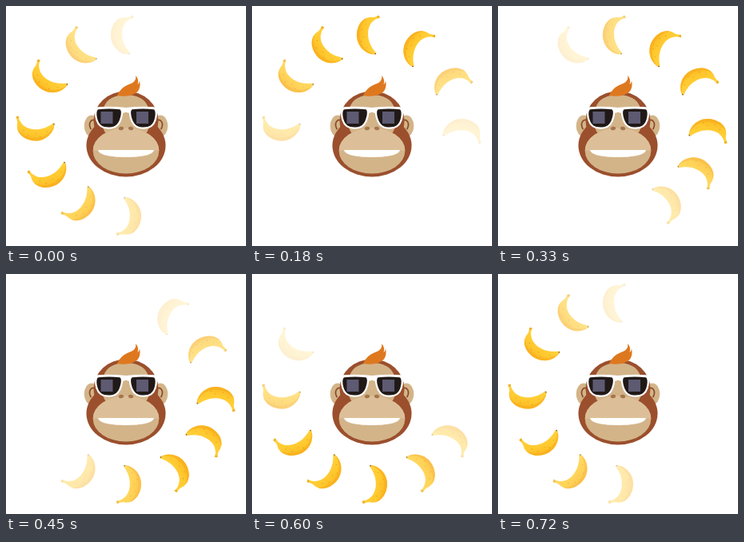
Write an HTML page that moves like this. It is 300 by 300 pixels and loops after 0.75 s.

```html
<!DOCTYPE html>
<html lang="en">
<head>
<meta charset="utf-8">
<title>Banana spinner</title>
<style>
  html, body { margin: 0; width: 100%; height: 100%; overflow: hidden; background: #fff; }
  svg { display: block; width: 100vw; height: 100vh; }
</style>
</head>
<body>
<svg viewBox="0 0 300 300" xmlns="http://www.w3.org/2000/svg">
  <defs>
    <linearGradient id="peel" x1="0" y1="0" x2="0" y2="1">
      <stop offset="0.1" stop-color="#ffd13a"/>
      <stop offset="0.6" stop-color="#ffc92f"/>
      <stop offset="1" stop-color="#fbb822"/>
    </linearGradient>

    <!-- Stem at (-24,0), tip at (24,0), belly towards +y -->
    <g id="banana">
      <path fill="url(#peel)" d="M-25.4 .2 L-22.4 -1.4 C-21.2 2 -20.2 4 -18.2 5.8
        C-14.500 10 -9 12 -2 11.700 C8 11 15.500 6 21.700 -.6 L23.500 .2
        C24.600 7.500 21.200 15.500 14.500 20.600 C7 26.300 -3 27 -11.500 23.600
        C-18.500 20.300 -22.600 14.500 -22.200 8 C-22.400 5 -24 3 -25.400 .2Z"/>
      <path fill="#f8ac1c" opacity=".6" d="M23.500 1.500 C24.300 8 21 15.700 14.500 20.600
        C7 26.300 -3 27 -11.500 23.600 C-16 21.500 -19.500 18.500 -21 14.500
        C-13 23 1 24.600 11.500 18.500 C18 14.200 21.800 8.500 23.500 1.500Z"/>
      <path fill="#edb02b" d="M-25.400 .2 L-22.400 -1.400 L-21.700 1 L-24.100 2.500Z"/>
      <path fill="#7a5220" d="M21.900 -.6 L23.300 -.4 L23.700 1.300 L22.600 1.200Z"/>
      <g fill="#d29222">
        <circle cx="-13" cy="15" r=".6"/>
        <circle cx="-6" cy="20" r=".6"/>
        <circle cx="3" cy="16.500" r=".5"/>
        <circle cx="9" cy="19" r=".6"/>
        <circle cx="16" cy="11" r=".5"/>
      </g>
    </g>

    <g id="ear">
      <ellipse cx="107" cy="150" rx="9.300" ry="13.400" fill="#d3b489"/>
      <path d="M106 153.500 C102.500 147 106 140.500 111.500 143" fill="none" stroke="#8a4a28" stroke-width="1.700" stroke-linecap="round"/>
    </g>

    <path id="lens" d="M115.500 129.300 Q129 127.800 142 129.300 C144.800 130 144.300 137 141.500 143.500
      C138.500 150 134 151.500 128 151.500 C120.500 151.500 116.500 148.500 114.500 142 C112.800 136.500 112.800 130 115.500 129.300Z"/>
  </defs>

  <g id="ring"></g>

  <use href="#ear"/>
  <use href="#ear" transform="matrix(-1 0 0 1 300 0)"/>
  <g fill="#9b4f2d">
    <ellipse cx="150" cy="143.500" rx="40.500" ry="37"/>
    <ellipse cx="150" cy="174.500" rx="49.500" ry="39"/>
  </g>
  <g fill="#d3b489">
    <path d="M150 111 C164 111 174 116 178 127 C183 136 181 155 172 163
      H128 C119 155 117 136 122 127 C126 116 136 111 150 111Z"/>
    <ellipse cx="150" cy="181" rx="41.300" ry="28.500"/>
  </g>
  <path fill="#dcbf98" d="M108.700 180.500 A41.300 28 0 0 1 191.300 180.500Z"/>
  <path fill="#de781f" d="M139 112 C143 103 149 99.500 156 97 C161 95 163 91 162 87
    C165 90 166 94 164.500 98 C166 97 167 95 167 93 C168.500 100 167 106 162 109
    C155 113 146 113.500 139 112Z"/>

  <g fill="#a47650">
    <ellipse cx="144" cy="153" rx="3.200" ry="2.200" transform="rotate(-15 144 153)"/>
    <ellipse cx="156" cy="153" rx="3.200" ry="2.200" transform="rotate(15 156 153)"/>
  </g>
  <path fill="#fff" d="M115 180 H185 C184 186 170 189 150 189 C130 189 116 186 115 180Z"/>

  <g fill="#fff" stroke="#fff" stroke-width="4.600" stroke-linejoin="round">
    <use href="#lens"/>
    <use href="#lens" transform="matrix(-1 0 0 1 300 0)"/>
  </g>
  <path fill="#fff" d="M110.500 126.500 Q130 125 150 127 Q170 125 189.500 126.500 L188.500 132 H157
    Q154 132 153 134 Q150 131.500 147 134 Q146 132 143 132 H111.500Z"/>
  <g fill="#211917">
    <use href="#lens"/>
    <use href="#lens" transform="matrix(-1 0 0 1 300 0)"/>
  </g>
  <g fill="#5d5a72">
    <rect x="118.500" y="132" width="15" height="15"/>
    <rect x="163" y="132" width="15" height="15"/>
  </g>
</svg>

<script>
  const FRAME_MS = 30;
  const LOOP_FRAMES = 25;   // the last frame repeats the first pose
  const CYCLE = 24;
  const LIFE = 14;          // frames a banana stays visible
  const FADE = 0.2;         // opacity change per frame

  // Stem x, y and tip x, y, clockwise from the top
  const spots = [
    [158.5, 14, 154.5, 60], [228, 38, 201, 76], [274, 96, 231, 111],
    [284, 171, 239, 162], [262, 228, 225, 201], [212, 271, 193, 229],
    [139, 285, 148, 239], [69.5, 259, 103.5, 225], [28, 207, 74, 195],
    [14, 138.5, 61, 147.5], [41, 68, 77, 98], [88.5, 26.5, 113.5, 66.5]
  ];

  const ring = document.getElementById("ring");
  const bananas = spots.map(([sx, sy, tx, ty]) => {
    const use = document.createElementNS("http://www.w3.org/2000/svg", "use");
    const angle = Math.atan2(ty - sy, tx - sx) * 180 / Math.PI;
    use.setAttribute("href", "#banana");
    use.setAttribute("transform", `translate(${(sx + tx) / 2} ${(sy + ty) / 2}) rotate(${angle})`);
    return ring.appendChild(use);
  });

  function draw(time) {
    const frame = Math.floor(time / FRAME_MS) % LOOP_FRAMES;
    bananas.forEach((banana, i) => {
      const age = (frame - 2 * i + 2 * CYCLE) % CYCLE;
      const alpha = Math.min(1, (age + 1) * FADE, (LIFE - age) * FADE);
      banana.setAttribute("opacity", Math.max(0, alpha));
    });
  }

  const start = performance.now();
  function tick() {
    draw(performance.now() - start);
    requestAnimationFrame(tick);
  }
  tick();
</script>
</body>
</html>
```
